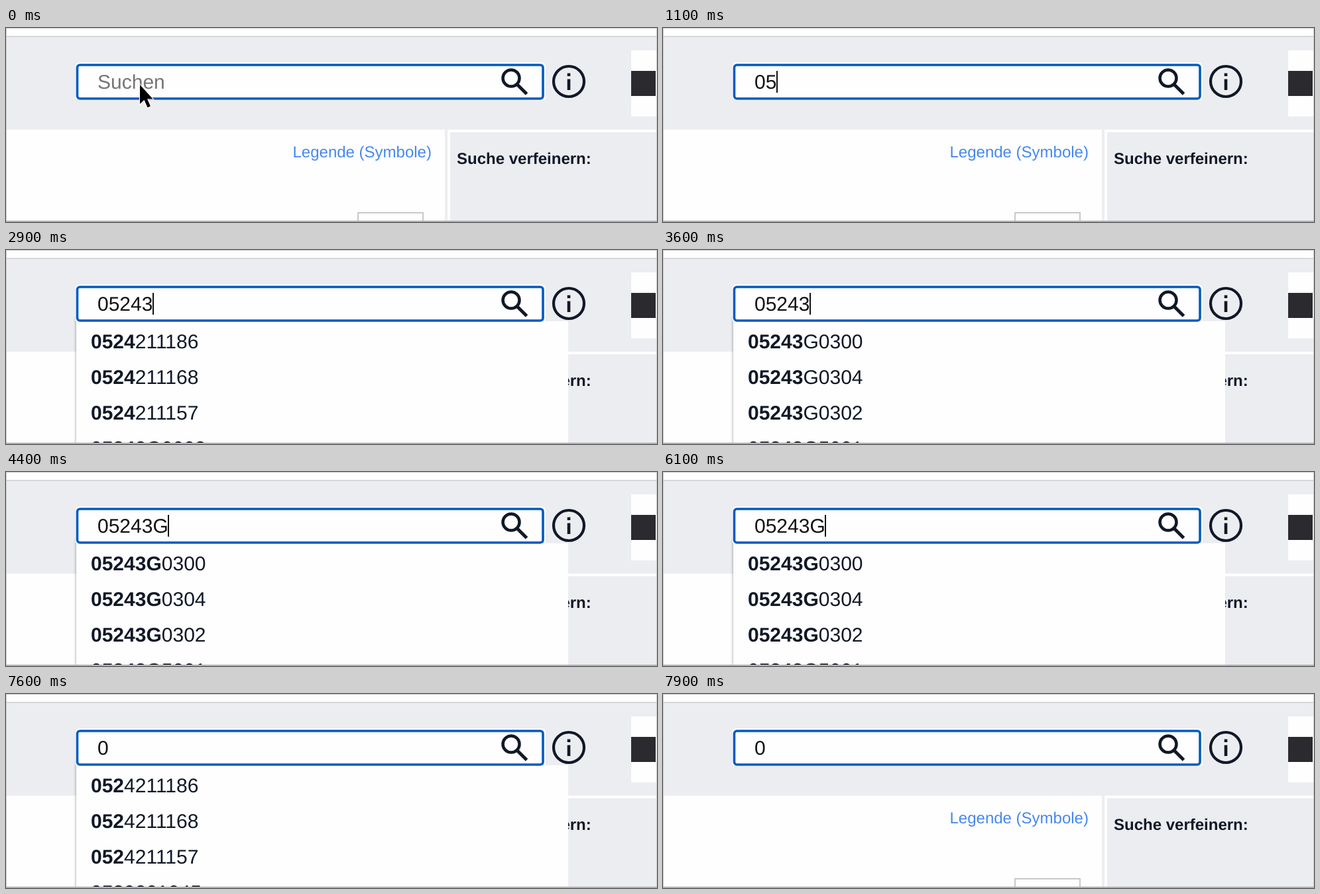
An HTML page that plays this animation: 982 by 294 pixels, repeating every 8 s.

```html
<!DOCTYPE html>
<html lang="de">
<head>
<meta charset="utf-8">
<title>Suche</title>
<style>
  html, body { margin: 0; width: 100%; height: 100%; overflow: hidden; background: #fefefe; }
  svg { display: block; width: 982px; height: 294px; }
  text { font-family: "Liberation Sans", Arial, sans-serif; font-size: 30px; fill: #111827; text-rendering: geometricPrecision; white-space: pre; }
  .bold { font-weight: bold; }
  .small { font-size: 24px; }
  #shade { filter: drop-shadow(0 3px 2px rgba(0, 0, 0, .42)); }
</style>
</head>
<body>
<svg viewBox="0 0 982 294">
  <!-- page -->
  <rect width="982" height="294" fill="#fefefe"/>
  <rect y="12" width="982" height="142" fill="#ecedf1"/>
  <rect y="12" width="982" height="1.5" fill="#cfcfd1"/>
  <rect x="662" y="154" width="4" height="140" fill="#ecedf1"/>
  <rect x="670" y="158" width="312" height="136" fill="#ecedf1"/>
  <rect x="531" y="280" width="98" height="20" fill="#fefefe" stroke="#c8c8ca" stroke-width="2"/>
  <text class="small" x="432.500" y="196" style="fill:#4588f0">Legende (Symbole)</text>
  <text class="small bold" x="680" y="206">Suche verfeinern:</text>
  <rect x="943" y="34" width="39" height="100" fill="#fefefe"/>
  <rect x="943" y="65" width="37" height="38" fill="#2b2b2f"/>

  <!-- suggestions -->
  <g id="panel">
    <rect id="shade" x="106" y="100" width="704" fill="#fefefe"/>
    <rect id="sheet" x="107.500" y="108" width="740.500" fill="#fefefe"/>
    <g id="rows"></g>
  </g>

  <!-- search field -->
  <path d="M106 108V58Q106 53 111 53H807Q813 53 813 59V104Q813 110 807 110" fill="none" stroke="#fff" stroke-width="2"/>
  <rect x="107.500" y="56" width="702.500" height="51" rx="4" fill="#fefefe" stroke="#025bc2" stroke-width="3.600"/>
  <text id="field" x="138" y="92"></text>
  <rect id="caret" y="65" width="2" height="33" fill="#111"/>
  <g fill="none" stroke="#111827">
    <circle cx="762" cy="76" r="12.500" stroke-width="4.500"/>
    <path d="M771 85.500L785.500 100" stroke-width="5"/>
    <circle cx="849" cy="81" r="23" stroke-width="4.200"/>
    <path d="M849 68.500V73M849 77.500V94" stroke-width="4.600"/>
  </g>
  <path id="pointer" d="M202 86V115L208.500 109L213.500 120.500L218 118.500L213 107.500H221.500Z"
        fill="#000" stroke="#fff" stroke-width="2" paint-order="stroke"/>

  <!-- window edge -->
  <rect x=".5" y=".5" width="981" height="293" fill="none" stroke="#cdcdcf"/>
  <rect y="292" width="982" height="1.500" fill="#a9a9ab"/>
</svg>
<script>
  const LOOP = 8000, BLINK = 500, ROW = 54;
  const el = id => document.getElementById(id);

  // [start in ms, field content]
  const typed = [
    [0, ""], [100, "0"], [1100, "05"], [2100, "052"], [2300, "0524"], [2600, "05243"], [4100, "05243G"],
    [6600, "05243"], [7000, "0524"], [7200, "052"], [7300, "05"], [7500, "0"]
  ];
  const keyTimes = [100, 1100, 2100, 2300, 2600, 4100];

  // [start in ms, query whose suggestions are listed]
  const queries = [
    [0, ""], [1300, "05"], [2400, "052"], [2700, "0524"], [3000, "05243"], [4400, "05243G"],
    [7000, "05243"], [7300, "0524"], [7500, "052"], [7700, ""]
  ];

  const numeric = ["0524211186", "0524211168", "0524211157"];
  const lettered = ["05243G0300", "05243G0304", "05243G0302", "05243G5001"];
  const suggestions = {
    "": [],
    "05": ["05"],
    "052": [...numeric, "0529201045"],
    "0524": [...numeric, "05243G0003"],
    "05243": lettered,
    "05243G": lettered
  };

  const valueAt = (steps, t) => steps.findLast(([start]) => start <= t)[1];
  let shownQuery = null;

  function showSuggestions(query) {
    if (query === shownQuery) return;
    shownQuery = query;
    const items = suggestions[query];
    const bottom = 112 + ROW * items.length;
    el("panel").style.display = items.length ? "" : "none";
    el("shade").setAttribute("height", bottom - 100);
    el("sheet").setAttribute("height", bottom - 108);
    el("rows").innerHTML = items.map((item, i) =>
      `<text x="128" y="${149 + ROW * i}"><tspan class="bold">${query}</tspan>${item.slice(query.length)}</text>`
    ).join("");
  }

  function draw(t) {
    const value = valueAt(typed, t);
    const field = el("field");
    const label = value || "Suchen";
    if (field.textContent !== label) field.textContent = label;
    field.style.fill = value ? "#111" : "#757575";

    const lastKey = keyTimes.findLast(time => time <= t);
    const caretOn = value && Math.floor((t - lastKey) / BLINK) % 2 === 0;
    el("caret").style.display = caretOn ? "" : "none";
    if (caretOn) el("caret").setAttribute("x", Math.floor(138 + field.getComputedTextLength()));

    el("pointer").style.display = value ? "none" : "";
    showSuggestions(valueAt(queries, t));
  }

  const begin = performance.now();
  function tick() {
    draw((performance.now() - begin) % LOOP);
    requestAnimationFrame(tick);
  }
  tick();
</script>
</body>
</html>
```
